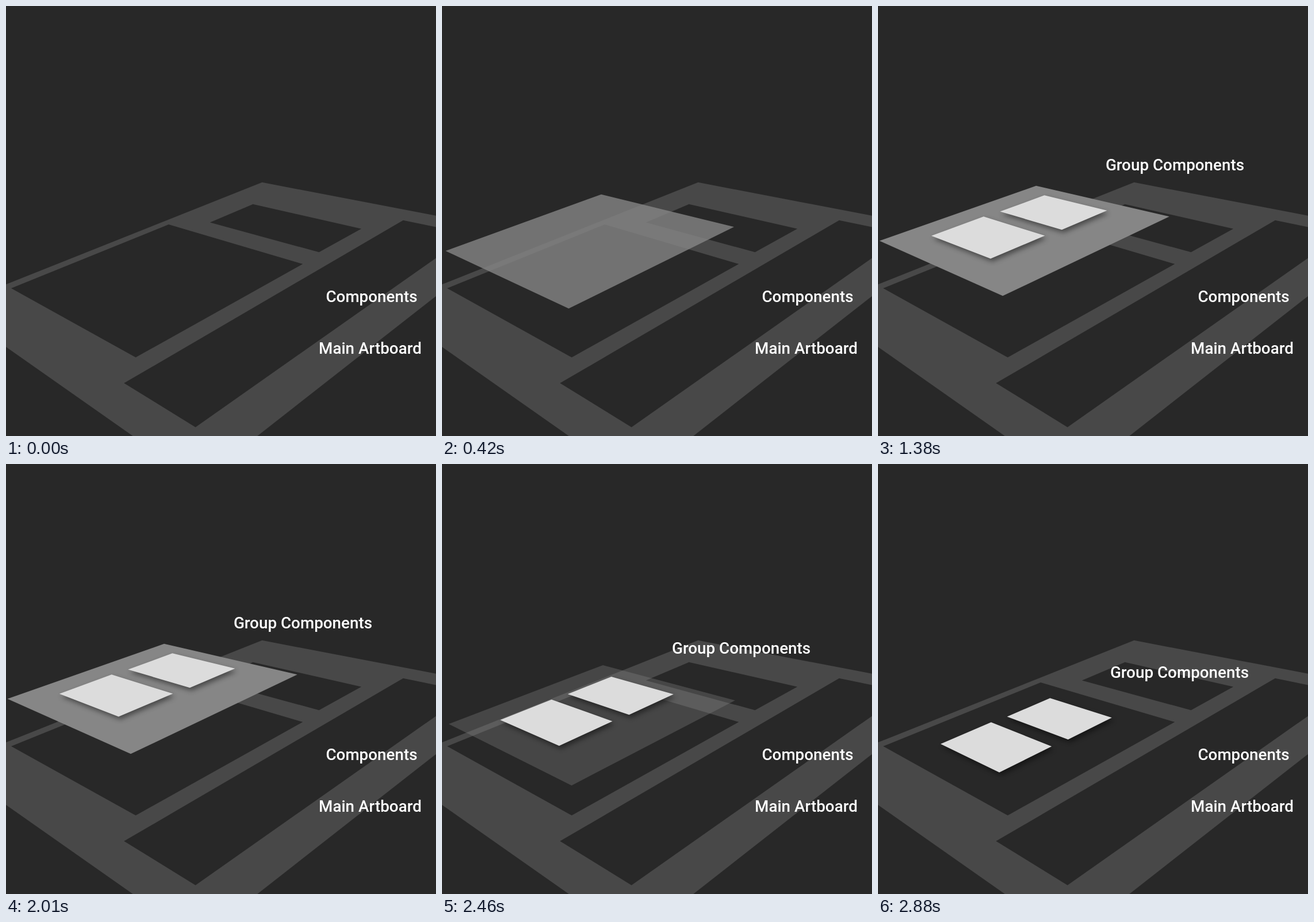
Animation, 748 px wide and 748 px high, one loop 4.02 s. Source, as an HTML page:

```html
<!DOCTYPE html>
<html lang="en">
<head>
<meta charset="utf-8">
<title>Artboard layers</title>
<style>
  html, body { margin: 0; width: 100%; height: 100%; overflow: hidden; background: #282828; }
  svg { display: block; width: 100vw; height: 100vh; }
  text { font: 500 27.8px Roboto, sans-serif; fill: #fff; text-anchor: middle; }
  .board { fill: #484848; }
  .hole { fill: #282828; }
  .canvas { fill: #868686; }
  .card { fill: #dcdcdc; filter: drop-shadow(3px 5px 4px rgba(0, 0, 0, .45)); }
</style>
</head>
<body>
<svg viewBox="0 0 748 748">
  <g id="sheets"></g>
  <text x="636" y="514.5">Components</text>
  <text x="633.5" y="604.5">Main Artboard</text>
  <text id="edit" x="632.5" y="390">Editting Canvas</text>
  <text id="group">Group Components</text>
</svg>
<script>
const LOOP = 4020, STEP = 30;
const el = id => document.getElementById(id);

// Perspective view of board position (u, v) at height h
function project(u, v, h) {
  const w = 1 + 0.212 * u - 0.2269 * v - 0.024 * h;
  const x = 9 + 334 * u + 165 * v - 18.1 * h;
  const y = 491 - 30.4 * u - 18.6 * v - 96 * h;
  return [x / w, y / w];
}

// Adds a rectangle lying parallel to the board and returns its mover
function sheet(kind, u, v, du, dv) {
  const shape = document.createElementNS('http://www.w3.org/2000/svg', 'polygon');
  shape.setAttribute('class', kind);
  el('sheets').append(shape);
  return (h, alpha) => {
    const corners = [[u, v], [u + du, v], [u + du, v + dv], [u, v + dv]];
    shape.setAttribute('points', corners.map(([a, b]) => project(a, b, h)).join(' '));
    shape.style.opacity = alpha;
  };
}

const ground = [
  sheet('board', -0.277, -0.0655, 2.172, 1.72),
  sheet('hole', 0, 0, 1, 1.002),
  sheet('hole', 1.154, 0.192, 0.37, 0.79),
  sheet('hole', -0.127, 1.102, 1.872, 0.375)
];
const canvas = sheet('canvas', 0.006, 0.058, 0.953, 0.965);
const back = sheet('card', 0.573, 0.238, 0.295, 0.472);
const front = sheet('card', 0.184, 0.225, 0.297, 0.474);
ground.forEach(move => move(0, 1));

const clamp = x => Math.min(1, Math.max(0, x));
const ease = x => x < 0.5 ? 4 * x ** 3 : 1 - 4 * (1 - x) ** 3;
const ramp = (t, from, to) => ease(clamp((t - from) / (to - from)));

function draw(t) {
  const rise = ramp(t, 90, 615);
  const drop = ramp(t, 1990, 2920);
  const fade = ramp(t, 1982, 2822);
  const swap = ramp(t, 1080, 1380);

  canvas(0.04 + 0.96 * (rise - drop), rise * (1 - fade));
  back(1 - drop, ramp(t, 790, 1070));
  front(1 - drop, ramp(t, 940, 1240));

  el('edit').style.opacity = ramp(t, 430, 630) * (1 - swap);
  el('group').style.opacity = swap;
  el('group').setAttribute('x', 516.5 + 8 * drop);
  el('group').setAttribute('y', 286 + 86 * drop);
}

const start = performance.now();
function tick() {
  const t = (performance.now() - start) % LOOP;
  draw(Math.floor(t / STEP) * STEP);
  requestAnimationFrame(tick);
}
tick();
</script>
</body>
</html>
```
